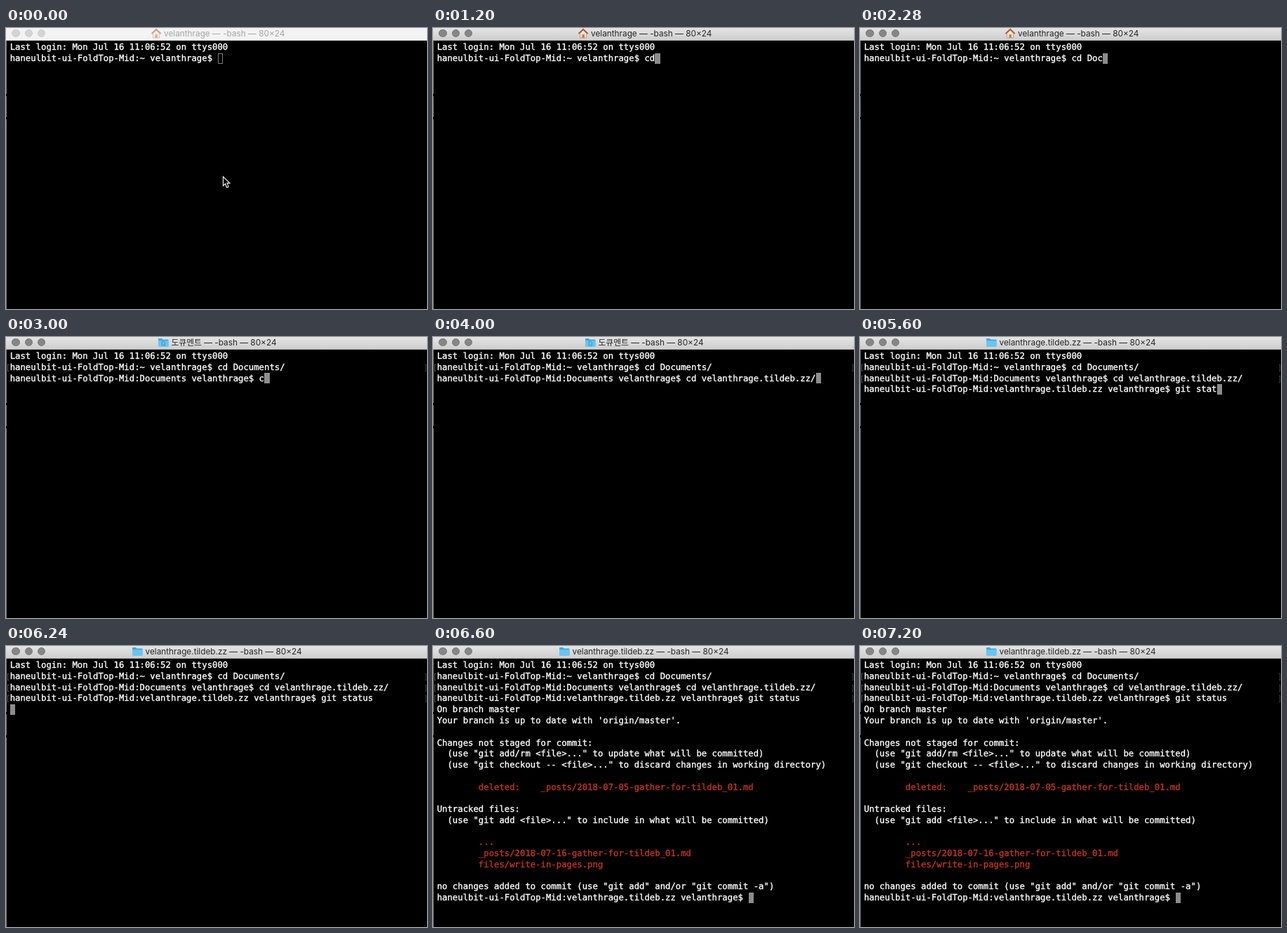
Animation of 600x400 px, one loop 7.24 s. Source, as an HTML page:

```html
<!DOCTYPE html>
<html lang="en">
<head>
<meta charset="utf-8">
<title>Terminal</title>
<style>
  html, body { margin: 0; width: 100%; height: 100%; overflow: hidden; background: #000; }
  #stage { position: relative; width: 600px; height: 400px; overflow: hidden; background: #000; }
  #bar { position: absolute; left: 0; top: 0; width: 600px; height: 18px; box-sizing: border-box;
    background: linear-gradient(#e4e4e4, #cecece); border-bottom: 1px solid #b4b4b4; color: #262626; }
  #bar i { position: absolute; top: 1.6px; width: 11.4px; height: 11.4px; border-radius: 50%;
    box-sizing: border-box; background: #868686; border: 1px solid #777; }
  #bar svg { position: absolute; left: 0; top: 0; }
  #name { position: absolute; top: 0; white-space: pre;
    font: 11.8px/16px Inter, "Noto Sans CJK KR", "Noto Sans CJK", sans-serif; }
  .idle #bar { background: #f4f3f4; border-color: #dedede; color: #a6a6a6; }
  .idle #bar i { background: #d4d4d4; border-color: #cbcbcb; }
  .idle #bar svg { opacity: .55; }
  #edge { position: absolute; left: 0; top: 18px; width: 1px; height: 382px;
    background: linear-gradient(#777 76px, #000 76px 79px, #777 79px 109px, #000 109px 112px, #777 112px); }
  #rows { position: absolute; left: 5.7px; top: 20.2px; color: #fff; white-space: pre;
    font: 12.29px/15.76px "DejaVu Sans Mono", "Noto Sans Mono", monospace;
    -webkit-text-stroke: .35px; text-rendering: geometricPrecision; }
  .row { position: absolute; left: 0; height: 15.76px; }
  .red { color: #c23621; }
  .mark::before, .mark::after { content: ""; position: absolute; top: 3px; width: 2px; height: 10px;
    border: 1px solid #585858; box-sizing: border-box; }
  .mark::before { left: -3.7px; border-right: 0; }
  .mark::after { left: 591.8px; border-left: 0; border-color: #3c3c3c; }
  #caret { position: absolute; width: 7.4px; height: 15px; margin-top: -.4px;
    background: #8c8c8c; box-sizing: border-box; }
  .idle #caret { background: none; border: 1px solid #7d7d7d; }
  #mouse { position: absolute; left: 308px; top: 210px; }
</style>
</head>
<body>
<div id="stage">
  <div id="edge"></div>
  <div id="rows"></div>
  <div id="bar">
    <i style="left:8.3px"></i><i style="left:26.6px"></i><i style="left:45px"></i>
    <svg width="600" height="17">
      <g id="house" transform="translate(207.5 1)">
        <path d="M2 6.5V13H11.2V6.5L6.6 2Z" fill="#f3e6d2" stroke="#a28c76" stroke-width=".7"/>
        <path d="M0 7.2L6.6 .8L13.2 7.2" fill="none" stroke="#a7583a" stroke-width="1.8"/>
        <path d="M5 13V8.2H8.4V13Z" fill="#d9762e"/>
      </g>
      <g id="folder">
        <path d="M0 3Q0 2 1 2H5L6.5 3.4H13.5Q14.5 3.4 14.5 4.4V12.6Q14.5 13.6 13.5 13.6H1Q0 13.6 0 12.6Z" fill="#43a9de"/>
        <path d="M0 5.2H14.5V12.6Q14.5 13.6 13.5 13.6H1Q0 13.6 0 12.6Z" fill="#67c5f4"/>
        <path id="sheet" d="M5.3 6.2H8.2L9.5 7.5V12H5.3Z" fill="none" stroke="#2f8fc6" stroke-width=".9"/>
      </g>
    </svg>
    <span id="name"></span>
  </div>
  <svg id="mouse" width="14" height="20">
    <path d="M1.5 1.5V14.6L4.5 11.8L6.7 17L9.2 15.9L7 10.9H11Z" fill="#000" stroke="#fff" stroke-width="1.1"/>
  </svg>
</div>
<script>
const LOOP = 7240, CELL = 7.4, LINE = 15.76;
const user = 'velanthrage', site = user + '.tildeb.zz';
const prompt = dir => `haneulbit-ui-FoldTop-Mid:${dir} ${user}$ `;
const $ = id => document.getElementById(id);

const FOCUS = 440, REPLY = 6600;
// Each command: folder, title, icon and title x, Enter time, then [time, typed so far].
const commands = [
  { dir: '~', title: user, iconX: 0, nameX: 225, enter: 2640, keys: [
    [1000, 'c'], [1120, 'cd'], [1400, 'cd '], [1640, 'cd D'], [1840, 'cd Do'],
    [2040, 'cd Doc'], [2400, 'cd Documents/']] },
  { dir: 'Documents', title: '도큐멘트', iconX: 217, nameX: 235.5, enter: 4280, keys: [
    [2960, 'c'], [3120, 'cd'], [3240, 'cd '], [3400, 'cd v'], [3520, 'cd ve'],
    [3640, 'cd vel'], [3760, 'cd vela'], [3880, `cd ${site}/`]] },
  { dir: site, title: site, iconX: 180, nameX: 198.5, enter: 6160, keys: [
    [4600, 'g'], [4700, 'gi'], [4800, 'git'], [4900, 'git '], [5080, 'git s'], [5280, 'git st'],
    [5440, 'git sta'], [5560, 'git stat'], [5720, 'git statu'], [5840, 'git status']] }
];

const pad = ' '.repeat(8);
const reply = [
  'On branch master',
  "Your branch is up to date with 'origin/master'.",
  '',
  'Changes not staged for commit:',
  '  (use "git add/rm <file>..." to update what will be committed)',
  '  (use "git checkout -- <file>..." to discard changes in working directory)',
  '',
  pad + 'deleted:    _posts/2018-07-05-gather-for-tildeb_01.md',
  '',
  'Untracked files:',
  '  (use "git add <file>..." to include in what will be committed)',
  '',
  pad + '...',
  pad + '_posts/2018-07-16-gather-for-tildeb_01.md',
  pad + 'files/write-in-pages.png',
  '',
  'no changes added to commit (use "git add" and/or "git commit -a")'
];

function screenAt(t) {
  const rows = [{ text: 'Last login: Mon Jul 16 11:06:52 on ttys000' }];
  let current = commands[0];
  for (const cmd of commands) {
    current = cmd;
    const typed = cmd.keys.filter(k => k[0] <= t).pop();
    const done = t >= cmd.enter;
    rows.push({ text: prompt(cmd.dir) + (typed ? typed[1] : ''), mark: done });
    if (!done) return { rows, current };
  }
  if (t >= REPLY) {
    for (const text of reply) rows.push({ text, red: text.startsWith(pad) });
    rows.push({ text: prompt(site) });
  } else {
    rows.push({ text: '' });
  }
  return { rows, current };
}

function draw(t) {
  const { rows, current } = screenAt(t);
  const home = current === commands[0];
  $('stage').className = t < FOCUS ? 'idle' : '';
  $('mouse').style.display = t < commands[0].keys[0][0] ? '' : 'none';
  $('house').style.display = home ? '' : 'none';
  $('folder').style.display = home ? 'none' : '';
  $('folder').setAttribute('transform', `translate(${current.iconX} 0)`);
  $('sheet').style.display = current === commands[1] ? '' : 'none';
  $('name').style.left = current.nameX + 'px';
  $('name').textContent = current.title + ' — -bash — 80×24';

  const caret = document.createElement('div');
  const last = rows.length - 1;
  caret.id = 'caret';
  caret.style.left = rows[last].text.length * CELL + 'px';
  caret.style.top = last * LINE + 'px';
  $('rows').replaceChildren(caret, ...rows.map((row, i) => {
    const el = document.createElement('div');
    el.className = 'row' + (row.mark ? ' mark' : '') + (row.red ? ' red' : '');
    el.style.top = i * LINE + 'px';
    el.textContent = row.text;
    return el;
  }));
}

const times = [0, FOCUS, REPLY, ...commands.flatMap(c => [c.enter, ...c.keys.map(k => k[0])])];
const start = performance.now();
let shown = -1;
function tick() {
  const t = Math.max(0, performance.now() - start) % LOOP;
  const step = Math.max(...times.filter(x => x <= t));
  if (step !== shown) draw(shown = step);
  requestAnimationFrame(tick);
}
tick();
</script>
</body>
</html>
```
